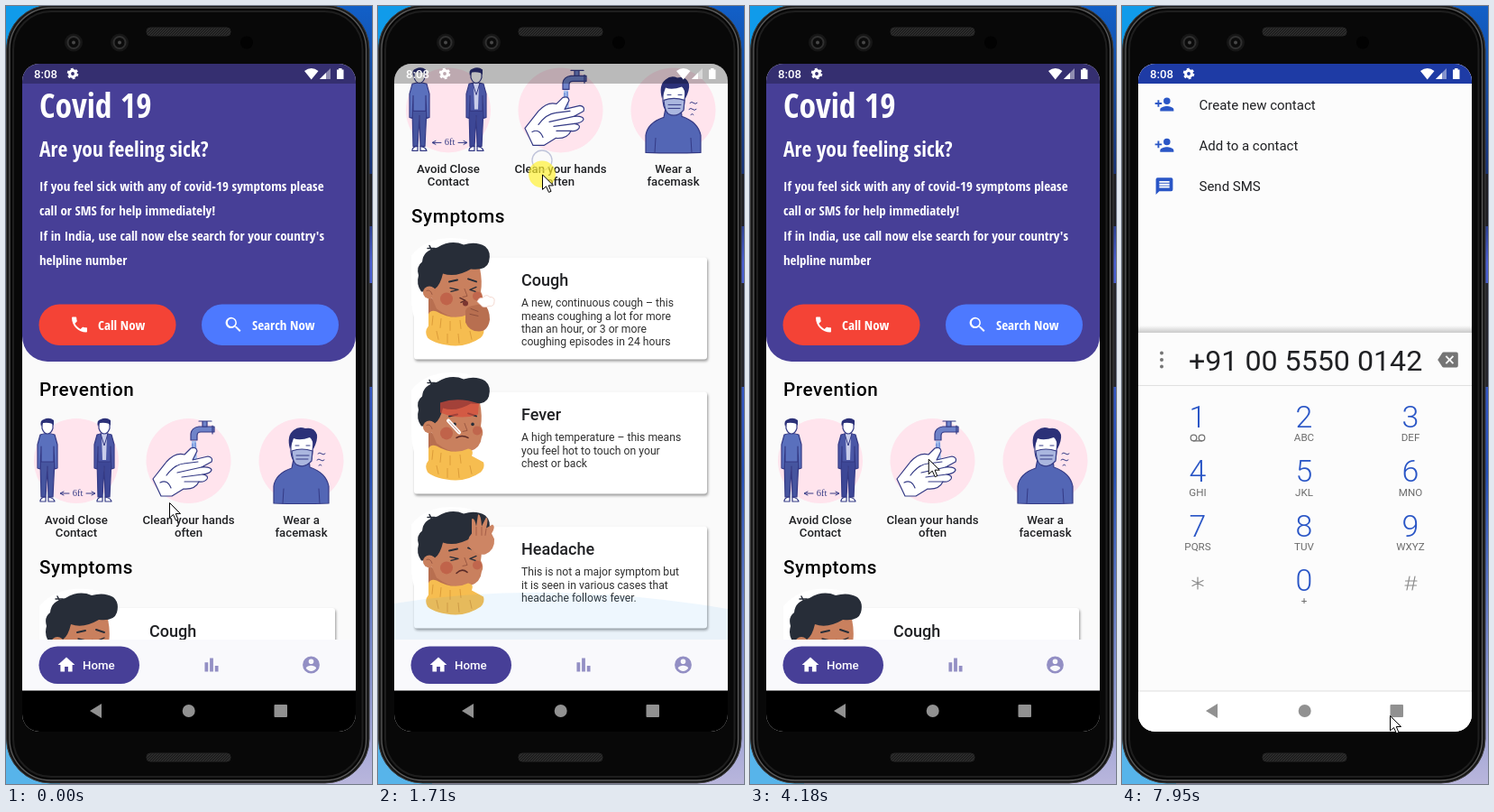
An HTML page that plays this animation: 406x862 px, repeating every 8000 ms.

```html
<!DOCTYPE html>
<html lang="en">
<head>
<meta charset="utf-8">
<title>Health app on a phone</title>
<style>
html, body { margin: 0; width: 100%; height: 100%; overflow: hidden; background: #111; }
svg { display: block; }
text { font: 400 15px Roboto, sans-serif; fill: #202124; }
.cond { font-family: "Open Sans Condensed", "Open Sans", sans-serif; font-stretch: 75%; font-weight: 700; fill: #fff; }
.mid { text-anchor: middle; }
.heading { font-size: 20.7px; font-weight: 500; letter-spacing: .6px; fill: #000; }
.label { font-size: 13.2px; font-weight: 500; }
.cardTitle { font-size: 18px; font-weight: 500; }
.small { font-size: 12.2px; fill: #303030; }
.digit { font-size: 33.9px; font-weight: 300; fill: #2a56c6; }
.letters { font-size: 11.6px; fill: #6b6b6b; }
.card { fill: #fff; filter: drop-shadow(1px 2px 1.5px #0006); }
.ink { stroke: #343a85; stroke-width: 1.2; stroke-linejoin: round; stroke-linecap: round; }
.line { fill: none; }
</style>
</head>
<body>
<svg id="stage" width="406" height="862" viewBox="0 0 406 862"></svg>
<script>
const text = (x, y, str, cls = '', size = '') =>
  `<text x="${x}" y="${y}" class="${cls}" ${size && `style="font-size:${size}px"`}>${str}</text>`;
const rect = (x, y, w, h, fill, rx = 0, more = '') =>
  `<rect x="${x}" y="${y}" width="${w}" height="${h}" rx="${rx}" fill="${fill}" ${more}/>`;
const circle = (x, y, r, fill, more = '') => `<circle cx="${x}" cy="${y}" r="${r}" fill="${fill}" ${more}/>`;
const path = (d, fill, more = '') => `<path d="${d}" fill="${fill}" ${more}/>`;
const stroke = (d, color, width = 1) =>
  path(d, 'none', `stroke="${color}" stroke-width="${width}" stroke-linecap="round" stroke-linejoin="round"`);
// Icons live on a 24 unit grid and are centred on (x, y).
const icon = (x, y, d, fill, size = 22.6) =>
  `<g transform="translate(${x - size / 2} ${y - size / 2}) scale(${size / 24})">${path(d, fill, 'fill-rule="evenodd"')}</g>`;
const group = (id, body, more = '') => `<g id="${id}" ${more}>${body}</g>`;

const ICONS = {
  home: 'M10 20v-6h4v6h5v-8h3L12 3 2 12h3v8z',
  bars: 'M4 9h4v11H4zM16 13h4v7h-4zM10 4h4v16h-4z',
  person: 'M2 12a10 10 0 1 0 20 0a10 10 0 1 0-20 0zM9 8a3 3 0 1 1 6 0a3 3 0 1 1-6 0zM6 16c0-2 4-3.1 6-3.1s6 1.1 6 3.1a7 7 0 0 1-12 0z',
  phone: 'M6.6 10.8c1.4 2.8 3.8 5.1 6.6 6.6l2.2-2.2c.3-.3.7-.4 1-.2 1.1.4 2.3.5 3.6.5.6 0 1 .5 1 1V20c0 .6-.4 1-1 1C10.600 21 3 13.400 3 4c0-.6.4-1 1-1h3.500c.6 0 1 .4 1 1 0 1.200.2 2.500.6 3.600.1.3 0 .7-.3 1z',
  search: 'M15.500 14h-1l-.2-.3a6.500 6.500 0 1 0-.6.700l.3.3v.8l5 5 1.500-1.500zM5 9.500a4.500 4.500 0 1 1 9 0a4.500 4.500 0 1 1-9 0z',
  addPerson: 'M11 8a4 4 0 1 1 8 0a4 4 0 1 1-8 0zM6 10V7H4v3H1v2h3v3h2v-3h3v-2zM15 14c-2.700 0-8 1.300-8 4v2h16v-2c0-2.700-5.300-4-8-4z',
  message: 'M20 2H4a2 2 0 0 0-2 2v18l4-4h14a2 2 0 0 0 2-2V4a2 2 0 0 0-2-2zM18 14H6v-2h12zM18 11H6V9h12zM18 8H6V6h12z',
  erase: 'M22 3H7c-.7 0-1.200.4-1.600.9L0 12l5.400 8.100c.4.5.9.9 1.600.9h15a2 2 0 0 0 2-2V5a2 2 0 0 0-2-2zM19 15.600 17.600 17 14 13.400 10.400 17 9 15.600 12.600 12 9 8.400 10.400 7 14 10.600 17.600 7 19 8.400 15.400 12z'
};
const PURPLE = '#473f97', NAVY = '#343a85', BLUE = '#2a56c6';

function header() {
  const lines = ['If you feel sick with any of covid-19 symptoms please', 'call or SMS for help immediately!',
    'If in India, use call now else search for your country\'s', 'helpline number'];
  return path('M18 64H388V366a28 28 0 0 1-28 28H46a28 28 0 0 1-28-28z', PURPLE) +
    text(37, 123.500, 'Covid 19', 'cond', 37.600) + text(37, 167, 'Are you feeling sick?', 'cond', 23.400) +
    lines.map((line, i) => text(37, 205 + i * 27.300, line, 'cond', 15)).join('') +
    rect(36.500, 330.500, 152, 45.500, '#f44336', 22.700) +
    '<g clip-path="url(#callClip)"><circle id="ripple" cx="112" cy="348" fill="#fff"/></g>' +
    icon(81.500, 353, ICONS.phone, '#fff') + text(102, 358.500, 'Call Now', 'cond', 15) +
    rect(217, 330.500, 152, 45.500, '#4d79ff', 22.700) +
    icon(252.500, 353, ICONS.search, '#fff') + text(273, 358.500, 'Search Now', 'cond', 15);
}

function standingMan(x, jacket) {
  const ink = 'class="ink"';
  return `<g transform="translate(${x} 0)">` +
    path('M-8 502H8L6 544H1L0 510-2 544H-7z', jacket ? '#3d4796' : '#46559f', ink) +
    path('M-8 475Q0 472 8 475L11 486V512L8 513 7 488V505H-7V488L-8 513-11 512V486z', jacket ? '#4b57a6' : '#5a70bd', ink) +
    (jacket ? path('M-3 474H3L2 503H-2z', '#c9cdea') + stroke('M-4 474 0 487 4 474', NAVY) : '') +
    path('M-6 462Q0 457 6 462V468Q4 474 0 474T-6 468z', '#fff', ink) +
    path('M-7 466Q-9 459-4 458 2 455 7 459L7 465Q5 461-5 462z', '#2c3178') +
    path('M-8 548Q-7 544-2 544V549H-8zM1 544Q7 545 8 549H1z', '#fff', ink) + '</g>';
}

function tapAndHands() {
  const ink = 'class="ink"';
  return path('M205 481V474Q206 467 214 466H231V472H216Q212 472 212 476V481z', '#6f83c9', ink) +
    path('M218 460H223V466H218zM214 460H228M229 465V474', '#6f83c9', ink) +
    path('M206 482H211L212 506H205z', '#a9c4f0') + stroke('M207 485V502M210 484V498', '#5672c9') +
    path('M163 524 178 505Q188 494 198 497L205 490Q211 488 212 493L207 503 224 499Q230 500 228 505L217 511Q227 510 228 514 227 518 218 519 225 520 223 524 220 528 214 527 210 536 197 535L184 543H172z', '#fff', ink) +
    '<g class="ink line"><path d="M178 520Q187 508 197 507L213 505M190 517 217 511M195 522 218 519M198 527 214 527M171 528Q179 524 183 534"/></g>';
}

function maskedMan() {
  const ink = 'class="ink"';
  return path('M297 551V532Q299 518 317 512L319 502H336L337 511Q355 517 358 532V551Q327 552 297 551z', '#5366b5', ink) +
    path('M316 482Q315 470 327 470 341 469 341 484L339 502Q334 511 324 508 317 505 316 494z', '#fff', ink) +
    path('M315 491Q311 476 319 470 325 465 332 468 342 466 345 475 346 481 341 491 341 481 337 478 326 482 319 479z', '#2c3178') +
    path('M317 493Q328 489 340 493L339 504Q331 513 322 508 318 505 317 493z', '#aab6df', ink) +
    stroke('M322 498H336M322 502H335M321 487H325M333 487H337M307 551 308 535M348 551 347 535', NAVY) +
    stroke('M346 496q2-2 4 0t4 0M345 503q2-2 4 0t4 0M347 509q2-2 3 0', NAVY);
}

function prevention() {
  const labels = [[78, 'Avoid Close', 'Contact'], [202.500, 'Clean your hands', 'often'], [327.500, 'Wear a', 'facemask']];
  return text(37, 432, 'Prevention', 'heading') +
    labels.map(([x, first, second]) => circle(x, 504, 47, '#ffe4ed') +
      text(x, 573.500, first, 'label mid') + text(x, 588, second, 'label mid')).join('') +
    standingMan(46, false) + standingMan(109, true) +
    stroke('M61 540H70M64 538 60 540 64 542M89 540H98M95 538 99 540 95 542', NAVY) +
    `<text x="79.500" y="543" class="mid" style="font:10.500px 'Liberation Serif',serif;fill:${NAVY}">6ft</text>` +
    tapAndHands() + maskedMan();
}

// Portraits are drawn relative to the top edge of their card.
function portrait(kind) {
  const skin = '#c9805e', dark = '#272d38';
  const extras = [
    stroke('M91 45 97 48 92 50', '#5b2b28', 1.500) + circle(97, 51, 3, '#7b3530') +
      path('M97 62Q96 56 103 54L117 51Q124 57 124 69 122 82 112 82 101 82 97 72z', '#b86f50') +
      stroke('M103 57 111 60M102 63 111 65', '#8d4f3c') +
      path('M110 49q2-5 6-4 4-5 8-1 6 0 5 5 0 6-6 5-6 3-9-1z', '#fff', 'stroke="#f0c9bd" stroke-width=".7"'),
    path('M69 12Q89 5 112 13L111 25Q92 32 69 23z', '#d84b3a', 'opacity=".7"') +
      stroke('M78 32 90 45', '#fff', 4) + stroke('M79 33 90 45', '#c99082', 1) + stroke('M87 51Q93 47 100 51', '#5b2b28', 1.500),
    stroke('M87 52Q93 46 99 51', '#5b2b28', 1.500) +
      path('M101 23Q98 14 104 8L104-8Q107-10 109 0L111-13Q114-14 115 0L120-10Q123-9 120 2L127-2Q131 0 126 8L129 14Q130 26 119 31 109 33 101 23z', '#cd8564') +
      stroke('M109 1V10M115 1V10M120 3 119 10', '#a55e48')
  ][kind];
  return path('M37-2Q55-24 90-21 122-18 126 6 130 49 107 75 88 100 58 94 37 76 37 45z', '#fff') +
    stroke('M55-10H63M57-13 60-7', dark, 1.500) +
    path('M56 44 56 72Q75 82 97 70L96 60z', '#b86f50') +
    path('M56 36Q56 12 83 8L113 12Q116 27 114 38 118 45 115 50 114 62 102 66 83 71 65 57z', skin) +
    path('M48 38Q42 30 45 20 42 10 49 5 50-8 66-11 81-20 95-14 109-18 119-12 126-6 123 5 120 15 103 13 86 23 72 18 69 31 63 35 59 31 54 38z', dark) +
    circle(57, 39, 7, skin) + stroke('M54 37Q58 35 60 41', '#9b5842') +
    circle(76, 46, 7, '#b84b3b', 'opacity=".55"') + circle(110, 43, 5, '#b84b3b', 'opacity=".5"') +
    stroke('M79 27 88 25M100 24 109 27', dark, 2) +
    (kind === 1 ? circle(85, 36, 1.800, dark) + circle(105, 36, 1.800, dark) : stroke('M80 34 89 36 81 38M109 33 102 36 108 38', dark, 1.300)) +
    stroke('M96 35 99 43 94 44', '#9b5842') +
    path('M56 63Q58 58 65 60 84 71 100 63 107 64 104 71L117 78Q119 84 114 89 101 98 86 98 64 97 55 89 51 82 56 76z', '#f6bd50') +
    stroke('M61 65 60 75M70 68 69 78M80 71V81M91 70 92 79M65 82 67 91M77 85V95M89 85 90 95M102 82 104 91', '#dc9c39') + extras;
}

function symptoms() {
  const cards = [
    ['Cough', 'A new, continuous cough – this', 'means coughing a lot for more', 'than an hour, or 3 or more', 'coughing episodes in 24 hours'],
    ['Fever', 'A high temperature – this means', 'you feel hot to touch on your', 'chest or back'],
    ['Headache', 'This is not a major symptom but', 'it is seen in various cases that', 'headache follows fever.']
  ];
  return text(37, 629, 'Symptoms', 'heading') + cards.map(([title, ...lines], i) =>
    `<g transform="translate(0 ${667 + i * 149})">` + rect(40, 0, 325, 113, '#fff', 3, 'class="card"') +
    portrait(i) + text(159, 32, title, 'cardTitle') +
    lines.map((line, row) => text(159, 55 + row * 14.200, line, 'small')).join('') + '</g>').join('');
}

function bottomBar() {
  return rect(18, 702, 370, 57, '#f9f9fc') + rect(36.500, 709.500, 111.500, 41.500, PURPLE, 20.700) +
    icon(67, 730, ICONS.home, '#fff') + text(85, 735, 'Home', 'label', 13.300).replace('<text', '<text fill="#fff" id="homeLabel"') +
    icon(228, 730, ICONS.bars, '#938fc4') + icon(338.500, 730, ICONS.person, '#938fc4');
}

function dialer() {
  const menu = [['addPerson', 'Create new contact'], ['addPerson', 'Add to a contact'], ['message', 'Send SMS']];
  const keys = ['', 'ABC', 'DEF', 'GHI', 'JKL', 'MNO', 'PQRS', 'TUV', 'WXYZ'];
  const entries = menu.map(([name, label], i) =>
    icon(47, 109 + i * 45.300, ICONS[name], BLUE) + text(85.500, 114.500 + i * 45.300, label)).join('');
  const keypad = keys.map((letters, i) => {
    const x = 84 + i % 3 * 118, y = 467 + Math.floor(i / 3) * 60.300;
    return text(x, y, i + 1, 'digit mid') + text(x, y + 15.300, letters, 'letters mid');
  }).join('');
  const pad = rect(18, 354, 370, 8, 'url(#padShadow)') + rect(18, 362, 370, 397, '#fcfcfc') +
    [384.500, 392, 399.500].map(y => circle(44, y, 2, '#757575')).join('') +
    text(74, 404, '+91 00 5550 0142', '', 32.200) + icon(361.500, 392, ICONS.erase, '#757575') +
    rect(18, 420, 370, 1, '#e0e0e0') + keypad +
    circle(79.500, 478.500, 3.300, 'none', 'stroke="#757575" stroke-width="1.300"') +
    circle(88.500, 478.500, 3.300, 'none', 'stroke="#757575" stroke-width="1.300"') + rect(79, 481.200, 10, 1.300, '#757575') +
    text(202, 648, '0', 'digit mid') + text(202, 663, '+', 'letters mid') +
    stroke('M84 633V646M78 636.500 90 642.500M90 636.500 78 642.500', '#8a8a8a', 1.200) +
    stroke('M319 632 316 647M325 632 322 647M314.500 637H327M314 642H326.500', '#8a8a8a', 1.200);
  return rect(18, 64, 370, 740, '#fcfcfc') + rect(18, 64, 370, 22, '#1e3ba5') + group('entries', entries) + group('pad', pad) +
    rect(18, 759, 370, 46, '#fff') + rect(18, 758.500, 370, 1, '#e0e0e0');
}

function statusIcons() {
  return text(31, 80, '8:08', 'label', 13.200).replace('<text', '<text id="clock"') +
    circle(74, 75, 3.400, 'none', 'stroke="#fff" stroke-width="3"') +
    circle(74, 75, 5.300, 'none', 'stroke="#fff" stroke-width="2" stroke-dasharray="2.800 2.750"') +
    path('M331 72Q338.700 66 346.500 72L338.700 81.500z', '#fff') +
    path('M360 69V81H348z', '#fff', 'opacity=".45"') + path('M355 74V81H348z', '#fff') +
    path('M367 70.500H369V69H372.500V70.500H374.500V81H367z', '#fff');
}

function systemNav() {
  return path('M93 781 106 773V789z', '#919191') + circle(202.700, 781, 7, '#919191') + rect(297.500, 774, 14.500, 14, '#919191', 1);
}

function phoneBody() {
  const speaker = y => rect(156, y, 93, 9, 'url(#mesh)', 4, 'stroke="#262626"');
  const lens = x => circle(x, 40.500, 10, '#161616') + circle(x, 40.500, 6.500, '#0b0b0b', 'stroke="#303030" stroke-width="2"') + circle(x, 40.500, 2, '#484848');
  return rect(0, 0, 406, 862, 'url(#wallpaper)') + rect(0, 0, 60, 60, '#109bea') + rect(0, 790, 60, 72, '#57b4ea') +
    rect(402, 186, 4, 58, '#1d1d22') + rect(402, 307, 4, 115, '#25252b') +
    rect(.5, -1, 402.500, 862, '#171717', 49, 'stroke="#3f3f3f"') +
    rect(4, 2, 395.500, 856, '#060606', 46, 'stroke="#5a5a5a" stroke-width="1.300"') +
    rect(8, 6, 387.500, 848, '#080808', 42, 'stroke="#1e1e1e" stroke-width="2"') +
    speaker(24) + speaker(828) + lens(75) + lens(126) + circle(267, 40.500, 7, '#020202');
}

const defs = `<defs>
  <linearGradient id="wallpaper" x2="0" y2="1"><stop stop-color="#1260c8"/><stop offset=".25" stop-color="#172a68"/>
    <stop offset=".33" stop-color="#4a5fd0"/><stop offset=".6" stop-color="#2450b8"/><stop offset="1" stop-color="#b9b6dc"/></linearGradient>
  <linearGradient id="padShadow" x2="0" y2="1"><stop stop-color="#000" stop-opacity="0"/><stop offset="1" stop-color="#000" stop-opacity=".2"/></linearGradient>
  <pattern id="mesh" width="3" height="3" patternUnits="userSpaceOnUse"><rect width="3" height="3" fill="#2c2c2c"/><path d="M0 3 3 0" stroke="#161616"/></pattern>
  <clipPath id="screenClip"><rect x="18" y="64" width="370" height="740" rx="19"/></clipPath>
  <clipPath id="listClip"><rect x="18" y="64" width="370" height="638"/></clipPath>
  <clipPath id="callClip"><rect x="36.500" y="330.500" width="152" height="45.500" rx="22.700"/></clipPath>
</defs>`;

const stage = document.getElementById('stage');
stage.innerHTML = defs + phoneBody() + '<g clip-path="url(#screenClip)">' +
  rect(18, 64, 370, 740, '#fafafa') +
  '<g clip-path="url(#listClip)">' + group('list', header() + prevention() + symptoms()) +
  path('M18 662Q190 635 388 668V702H18z', '#2196f3', 'id="glow"') + '</g>' +
  rect(18, 64, 370, 22, '#000', 0, 'opacity=".26"') + bottomBar() + rect(18, 758.500, 370, 46, '#000') +
  group('dialer', dialer()) + statusIcons() + systemNav() + '</g>' +
  circle(182, 171, 11, 'none', 'id="release" stroke="#9aa0c4" stroke-width="1.300"') +
  group('cursor', circle(0, 0, 15, '#fff02d', 'id="press"') +
    path('M.5.5V17L4.500 13.500 7.500 20 10 19 7.300 12.500H12.500z', '#fff', 'stroke="#000"'));

const part = Object.fromEntries([...stage.querySelectorAll('[id]')].map(el => [el.id, el]));
part.homeLabel.style.fill = part.clock.style.fill = '#fff';

// Linear interpolation through [time, value] or [time, x, y] keys.
function track(keys, t, axis = 1) {
  const next = keys.findIndex(key => key[0] > t);
  if (next === 0) return keys[0][axis];
  if (next < 0) return keys[keys.length - 1][axis];
  const a = keys[next - 1], b = keys[next];
  return a[axis] + (b[axis] - a[axis]) * (t - a[0]) / (b[0] - a[0]);
}
const easeOut = p => 1 - (1 - p) ** 3;

const SCROLL = [[400, 0], [700, 144], [1150, 389], [1710, 389], [2250, 165], [2640, 0]];
const POINTER = [[60, 181, 550], [150, 187, 590], [230, 177, 615], [400, 177, 612], [700, 176, 457], [1150, 180, 212],
  [1450, 182, 171], [1640, 182, 171], [1710, 182, 186], [2250, 183, 390], [2710, 190, 558], [2900, 192, 575],
  [3500, 196, 530], [4180, 198, 502], [4500, 116, 396], [4940, 195, 503], [5250, 230, 420], [5560, 112, 348],
  [6400, 112, 348], [7700, 297, 786]];
const PRESSES = [[330, 1600], [1660, 2900], [5640, 5900]];

function render(t) {
  part.list.setAttribute('transform', `translate(0 ${-track(SCROLL, t)})`);
  part.cursor.setAttribute('transform', `translate(${track(POINTER, t)} ${track(POINTER, t, 2)})`);
  part.press.setAttribute('opacity', PRESSES.some(([from, to]) => t >= from && t < to) ? .68 : 0);
  part.release.setAttribute('opacity', t > 1600 && t < 1780 ? .6 : 0);
  part.glow.setAttribute('opacity', track([[1150, 0], [1350, .08], [1710, .075], [2000, 0]], t));
  part.ripple.setAttribute('r', track([[5760, 0], [6110, 82]], t));
  part.ripple.setAttribute('opacity', track([[5760, .18], [6110, .18], [6260, 0]], t));

  const opening = easeOut(track([[6260, 0], [6480, 1]], t));
  part.dialer.setAttribute('opacity', opening);
  part.dialer.setAttribute('transform', `translate(0 ${60 * (1 - opening)})`);
  part.entries.setAttribute('opacity', track([[6950, 0], [7100, 1]], t));
  part.pad.setAttribute('transform', `translate(0 ${410 * (1 - easeOut(track([[6980, 0], [7300, 1]], t)))})`);
}

function frame() {
  render(performance.now() % 8000);
  requestAnimationFrame(frame);
}
frame();
</script>
</body>
</html>
```
